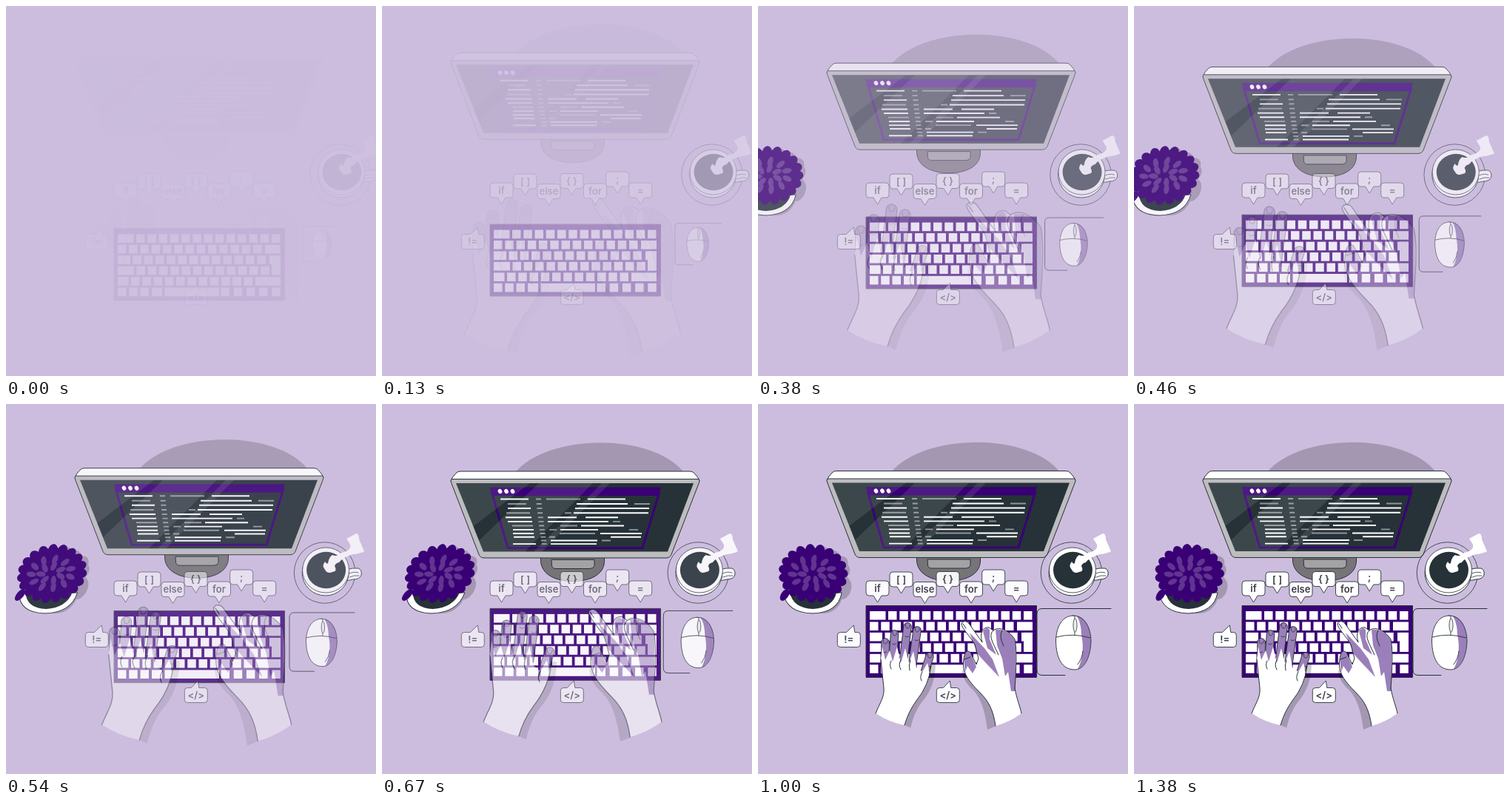
An HTML page that plays this animation: 500x500 px, repeating every 1620 ms.

```html
<!DOCTYPE html>
<html lang="en">
<head>
<meta charset="utf-8">
<title>Coding desk</title>
<style>
  html, body { margin: 0; height: 100%; overflow: hidden; background: #ccbdde; }
  svg { display: block; width: 100%; height: 100%; }
  .line { fill: none; stroke: #263238; stroke-linecap: round; stroke-linejoin: round; }
  .ink { stroke: #263238; stroke-linejoin: round; }
  .shadow { fill: #000; opacity: .2; }
  .purple { fill: #390075; }
  .tint { fill: #9b7fba; }
  text { font: 600 13px Inter, "Open Sans", sans-serif; fill: #3a3a46; text-anchor: middle; }
</style>
</head>
<body>
<svg viewBox="0 0 500 500">
  <g id="monitor">
    <path class="shadow" d="M180 92C225 39 365 38 408 92Z"/>
    <path class="ink" fill="#777478" d="M214.500 207V212C216 231 236 239 258 239S300 231 300.500 212V207Z"/>
    <path class="ink" fill="#a3a2a4" d="M229 210H287V218Q286 222 281 222H235Q230 222 229.500 218Z"/>
    <path class="ink" fill="#fff" d="M93 103Q95 98 100 93Q102 90.500 106 90.500H416Q420 90.500 422 93Q427 98 429 103L425 110H97Z"/>
    <path class="ink" fill="#bdbcbe" d="M94 101H428Q430 103 428 107L391 203Q389 207.500 384 207.500H138Q133 207.500 131 203L94 107Q92 103 94 101Z"/>
    <path fill="#263238" d="M100 106.500H421L386 199H137Z"/>
    <g id="code">
      <path d="M148 118L170 194H352L375 118" fill="none" stroke="#390075" stroke-width="3"/>
      <path class="purple" d="M145.500 112H377L373.500 123.500H149Z"/>
      <g fill="#fff">
        <ellipse cx="159.500" cy="117.500" rx="2.700" ry="3.200" transform="rotate(-30 159.500 117.500)"/>
        <ellipse cx="168" cy="117.500" rx="2.700" ry="3.200" transform="rotate(-30 168 117.500)"/>
        <ellipse cx="176.500" cy="117.500" rx="2.700" ry="3.200" transform="rotate(-30 176.500 117.500)"/>
      </g>
    </g>
    <g fill="#fff" opacity=".1">
      <path d="M100 106.500H200L123 165Z"/>
      <path d="M212 106.500H285L193 199H137L131 184Z"/>
      <path d="M297 106.500H308L216 199H205Z"/>
    </g>
  </g>

  <g id="plant">
    <path class="shadow" d="M78 196Q90 188 96 197Q108 196 112 205Q124 206 122 217Q128 224 121 234Q130 242 124 256Q118 265 113 264Q105 286 78 283Z"/>
    <path class="ink" fill="#fff" d="M34 255Q38 282 73 283Q108 282 113 255Z"/>
    <path fill="#263238" d="M43 255Q47 276 74 277Q101 275 106 255Z"/>
    <g id="leaves"></g>
  </g>

  <g id="coffee">
    <circle class="line" cx="423.500" cy="228" r="41.300" stroke-width=".8"/>
    <path class="ink" fill="#fff" d="M452 224Q462 221 469 222Q474 224 473 231Q471 237 462 237Q456 239 451 238Z"/>
    <path class="line" d="M457 229Q462 226 469 228M457 234Q463 231 470 232" stroke-width=".8"/>
    <ellipse class="ink" cx="424.500" cy="228" rx="31.500" ry="31" fill="#fff"/>
    <ellipse class="ink" cx="425" cy="224.500" rx="31.500" ry="30.500" fill="#fff" stroke-width=".8"/>
    <ellipse cx="425.500" cy="224.500" rx="26.500" ry="24.700" fill="#263238"/>
    <path fill="#fff" d="M453 182L466 175Q470 175 470 183L477 199Q472 202 462 203Q448 207 443 214Q438 215 437 219Q441 226 434 227Q427 230 424 224Q419 219 424 213Q426 217 428 215Q429 207 434 204Q440 207 446 201Q460 198 458 190Z"/>
  </g>

  <g id="mouse">
    <path class="line" d="M477 276.500H384Q377 276.500 377 284V359Q377 366.500 384 366.500H415"/>
    <path fill="#fff" d="M426 286C442 286 450 303 450 321C449 343 441 359 428 359C411 359 403 344 402.500 320C403 301 411 286 426 286Z"/>
    <path class="tint" d="M430 286C443 288 450 303 450 321C449 341 442 355 432 358.500C440 344 440 325 437 312C437 301 434 290 430 286Z"/>
    <path class="line" d="M426 286C442 286 450 303 450 321C449 343 441 359 428 359C411 359 403 344 402.500 320C403 301 411 286 426 286ZM403 315Q426 309 449 316M428 286V312M439 334Q438 344 432 352" stroke-width=".9"/>
    <ellipse class="ink" cx="428.500" cy="299" rx="2.500" ry="9" fill="#eee" stroke-width=".8"/>
  </g>

  <g id="keyboard">
    <rect class="ink purple" x="146" y="272.500" width="230.500" height="97"/>
    <g id="keys" fill="#fff"></g>
  </g>

  <g id="hands">
    <path class="shadow" d="M198 434L206 437.500Q212 414 222 402Q239 383 240 352L230 350Q232 374 212 398Z"/>
    <path class="shadow" d="M276 358Q276 374 290 386Q305 400 310 440L322 435L316 400L290 370Z"/>
    <g id="fingers"></g>
    <path fill="#fff" d="M159 418C165 403 171 396 170 384L166 345L168 328L172 346L178 333L182 348L188 328L193 350L199 330L204 350L210 334L214 356L222 362L229 350Q233 362 230 372Q226 386 214 401Q203 416 198 434Q177 430 159 418Z"/>
    <path class="line" d="M159 418C165 403 171 396 170 384L166 345M198 434Q203 416 214 401Q231 380 234 354M180 347Q177 353 180 358M193 346Q189 352 193 359M206 346Q203 353 205 360M222 362Q218 369 221 374"/>
    <path fill="#fff" d="M321 435C318 414 312 402 300 390C284 374 275 362 278 345C279 333 285 331 288 338L295 352L298 344L293 325C287 314 275 303 275 297C277 292 283 293 286 298L303 322C299 309 304 301 312 302L318 306C327 299 341 308 347 318C350 330 349 360 347 384C350 400 354 408 356 418Q340 430 321 435Z"/>
    <g class="tint">
      <path d="M321 305C334 303 347 312 348 324L348 388L342 388L338 362L334 368L330 344L323 326Z"/>
      <path d="M286 309L306 330L317 345L326 369L307 349L297 338Z"/>
      <path d="M304 307Q309 300 313 305L313 318L322 339L310 330Z"/>
      <path d="M278 345C279 333 285 331 288 339L295 355L290 364L283 354L280 362Z"/>
    </g>
    <path class="line" d="M321 435C318 414 312 402 300 390C284 374 275 362 278 345C279 333 285 331 288 338L295 352L298 344L293 325C287 314 275 303 275 297C277 292 283 293 286 298L303 322C299 309 304 301 312 302L318 306C327 299 341 308 347 318C350 330 349 360 347 384C350 400 354 408 356 418M318 306Q312 311 317 322L325 339M330 306Q325 313 332 327M279 345L287 342M277 297L281 303"/>
  </g>

  <g id="bubbles"></g>
</svg>
<script>
const byId = id => document.getElementById(id);
const add = (id, markup) => byId(id).insertAdjacentHTML('beforeend', markup);

// Code lines on the monitor: y, white spans, gray spans
const codeRows = [
  [128, [160, 198, 278, 329], [222, 268]],
  [134.5, [263, 332], [170, 195, 341, 362]],
  [140.5, [170, 201, 261, 361], []],
  [146.8, [259, 360], [168, 200, 247, 256]],
  [152.8, [167, 202, 224, 263, 275, 319], []],
  [158.4, [170, 203, 224, 306], [312, 322]],
  [164, [269, 327], [176, 204, 241, 264]],
  [169.4, [177, 205, 241, 292], [226, 236, 334, 346]],
  [174.5, [177, 205, 295, 351], [240, 288]],
  [179.3, [178, 206, 309, 350], [226, 234]],
  [184, [228, 291], [297, 309]],
  [188.6, [177, 208, 228, 290], []]
];
const spans = (list, y) => list.map((x, i) => i % 2 ? `H${x}` : `M${x} ${y}`).join('');
codeRows.forEach(([y, white, gray], i) => {
  const gutter = 208 + i * .7;
  add('code', `<path d="${spans(white, y)}" stroke="#fff" stroke-width="1.9"/>
    <path d="${spans([gutter, gutter + 7, ...gray], y)}" stroke="#8f9497" stroke-width="1.9"/>`);
});

// Keyboard: evenly pitched runs plus wide keys
const key = (row, x, w, h = 11.6) =>
  add('keys', `<rect x="${x}" y="${280 + row * 14.45}" width="${w}" height="${h}"/>`);
const keyRun = (row, x, count, pitch = 15.25, w = 11.5) => {
  for (let i = 0; i < count; i++) key(row, x + i * pitch, w);
};
key(0, 151, 21.5);  keyRun(0, 176, 13);
keyRun(1, 151, 13); key(1, 350, 21);
key(2, 151, 17);    keyRun(2, 171.5, 12); key(2, 356, 15);
key(3, 151, 22);    keyRun(3, 176.5, 12); key(3, 359, 12); key(2, 359, 12, 26);
key(4, 151, 14.5);  keyRun(4, 169, 11);   key(4, 337, 34);
keyRun(5, 151, 3);  key(5, 197, 14);      key(5, 214.5, 73.5); keyRun(5, 290.5, 5, 17.2);

// Plant: a core with outward leaves and lighter leaves inside
const leaf = (x, y, rx, ry, angle, fill) =>
  add('leaves', `<ellipse cx="${x}" cy="${y}" rx="${rx}" ry="${ry}" fill="${fill}" transform="rotate(${angle} ${x} ${y})"/>`);
leaf(75, 230, 39, 33, 0, '#390075');
for (let i = 0; i < 19; i++) {
  const a = i / 19 * Math.PI * 2;
  leaf(75 + 37 * Math.cos(a), 229 + 30 * Math.sin(a), 10, 7, a * 180 / Math.PI, '#390075');
}
leaf(36, 258, 9, 5, -55, '#390075');
[[11, 27, 19], [7, 14, 10]].forEach(([count, rx, ry]) => {
  for (let i = 0; i < count; i++) {
    const a = (i + .4) / count * Math.PI * 2;
    leaf(74 + rx * Math.cos(a), 229 + ry * Math.sin(a), 6.5, 3.6, a * 180 / Math.PI + 12, '#613490');
  }
});

// Left-hand fingers, each a capsule with a nail and a joint line
[[172, 322, 172, 350], [184.5, 311, 182, 350], [202, 301, 196, 350], [215, 306, 209, 350], [232, 341, 224, 366]]
  .forEach(([x, y, x2, y2]) => {
    const d = `M${x} ${y}L${x2} ${y2}`;
    add('fingers', `<path class="line" d="${d}" stroke-width="11.5"/>
      <path d="${d}" stroke="#9b7fba" stroke-width="9.6" stroke-linecap="round"/>
      <path class="line" stroke-width=".8" d="M${x - 2.5} ${y - 3}q-.5 5 2.500 5t3-4M${x - 3} ${y + 13}q3 2 5 0"/>`);
  });

// Speech bubbles: label, left, top, pointer (dx from left, side)
const bubble = (label, x, y, up) => {
  const pointer = up
    ? `h${up - 9}l${label === '!=' ? 10 : 9} -9.500l1.500 9.500H${x + 27}`
    : `H${x + 27}`;
  const bottom = up ? `H${x + 4}` : `H${x + 21}l-5.500 9l-5.500 -9H${x + 4}`;
  add('bubbles', `<path class="ink" fill="#fff" stroke-width=".9"
    d="M${x + 4} ${y}${pointer}q4 0 4 4v12q0 4 -4 4${bottom}q-4 0 -4 -4v-12q0 -4 4 -4Z"/>
    <text x="${x + 15.5}" y="${y + 14.5}">${label}</text>`);
};
bubble('if', 146, 239);
bubble('[ ]', 178, 227);
bubble('else', 210, 240.5);
bubble('{ }', 241, 226.5);
bubble('for', 272.5, 240);
bubble(';', 302.7, 224);
bubble('=', 333.7, 239);
bubble('!=', 107.3, 308.5, 17);
bubble('&lt;/&gt;', 241.3, 383.5, 14);

function bezier(x1, y1, x2, y2) {
  const curve = (a, b, s) => 3 * (1 - s) ** 2 * s * a + 3 * (1 - s) * s * s * b + s ** 3;
  return t => {
    if (t <= 0) return 0;
    if (t >= 1) return 1;
    let low = 0, high = 1;
    for (let i = 0; i < 24; i++) {
      const mid = (low + high) / 2;
      if (curve(x1, x2, mid) < t) low = mid; else high = mid;
    }
    return curve(y1, y2, low);
  };
}
const easeOut = bezier(0, 0, .58, 1);
const easeIn = bezier(.42, 0, 1, 1);
const overshoot = bezier(.36, -.01, .5, 1.38);

const place = (id, opacity, transform = '') => {
  byId(id).setAttribute('opacity', Math.min(1, Math.max(0, opacity)));
  byId(id).setAttribute('transform', transform);
};
const zoom = (x, y, s) => `translate(${x} ${y}) scale(${s}) translate(${-x} ${-y})`;

// Slides in while leaning, then the lean swings back to zero
function plantPose(t) {
  const enter = easeOut(t / .6);
  const skew = t < .6 ? 20 - 30 * enter
    : t < .8 ? -10 + 12 * easeOut((t - .6) / .2)
    : 2 - 2 * easeOut((t - .8) / .2);
  return [enter, `translate(${250 * (enter - 1)} 250) skewX(${skew}) translate(0 -250)`];
}

const LOOP = 1620, STEP = 1000 / 24;
function draw() {
  const step = Math.floor(performance.now() % LOOP / STEP + .1);
  const ms = (step + .8) * STEP;
  const t = ms / 1000;
  const out = easeOut(t), inn = easeIn(t), over = overshoot(t);
  place('monitor', over, `translate(0 ${-30 * (1 - over)})`);
  place('keyboard', out, `translate(0 ${30 * (1 - out)})`);
  place('coffee', out, `translate(${30 * (1 - out)} 0)`);
  place('mouse', out, zoom(427.5, 322, .5 + .5 * out));
  place('hands', inn, zoom(257, 367, 1.5 - .5 * inn));
  place('plant', ...plantPose(ms / 1200));
  place('bubbles', ms / 1110);
  requestAnimationFrame(draw);
}
draw();
</script>
</body>
</html>
```
